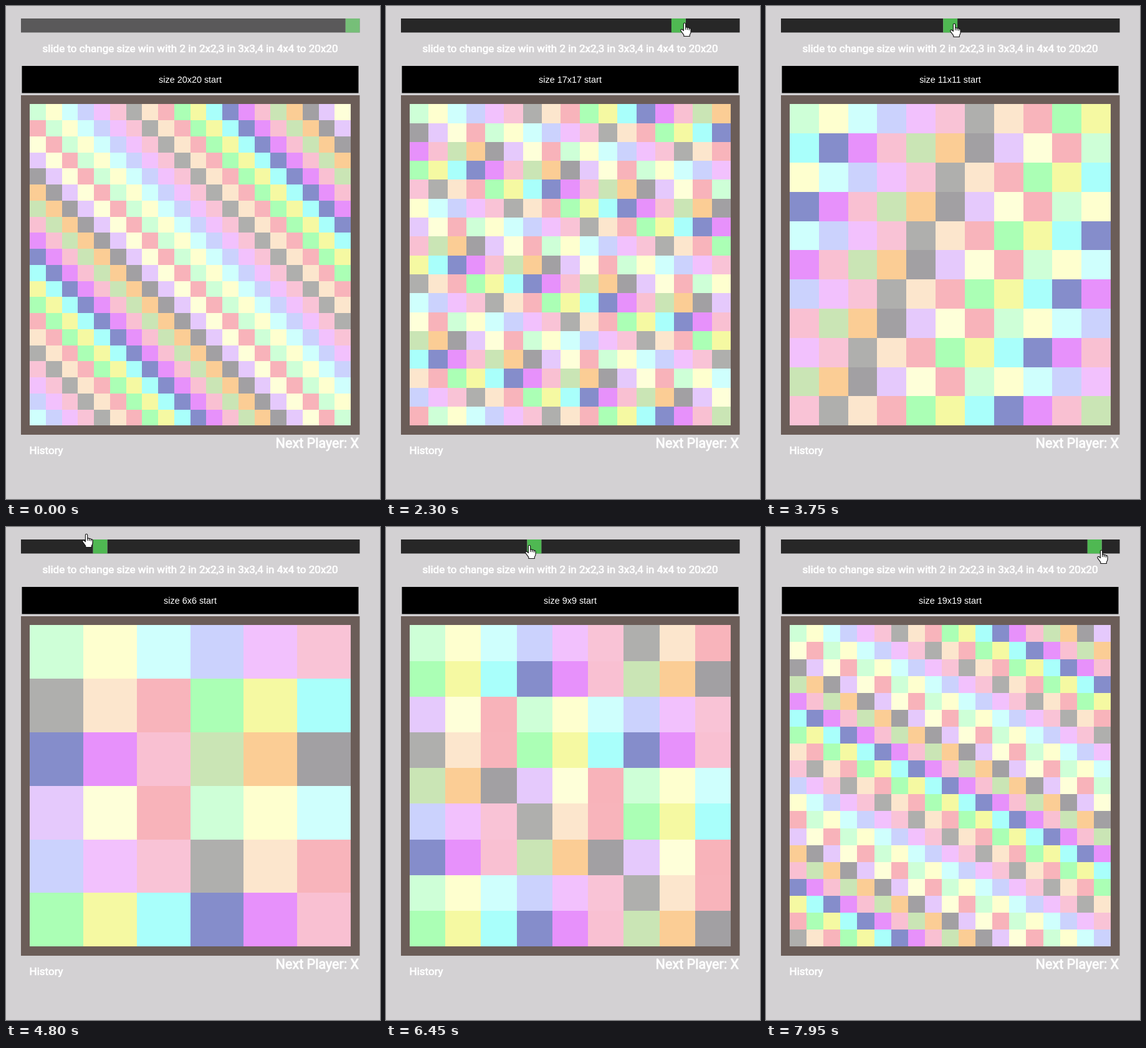
An HTML page with a canvas for the animation above (8 s loop, 600 by 790 pixels).

```html
<!DOCTYPE html>
<html lang="en">
<head>
<meta charset="utf-8">
<title>Board size slider</title>
<style>
html, body { margin: 0; width: 100%; height: 100%; overflow: hidden; background: #d3d1d3; }
canvas { display: block; }
</style>
</head>
<body>
<canvas id="stage" width="600" height="790"></canvas>
<script>
const ctx = document.getElementById('stage').getContext('2d');
const LOOP = 8000, STEP = 50;
const COLORS = ['#ceffd7', '#feffcf', '#cffffd', '#cbd2fd', '#f2c1fd', '#f9c3d6', '#afafad',
  '#fce6cd', '#f8b4bb', '#abffb5', '#f5f9a2', '#a9fffb', '#858dcb', '#e791fb', '#f9c0d2',
  '#cae5b5', '#fbcd95', '#a2a0a3', '#e5c9fc', '#feffd9', '#f8b3ba'];

// Keys are [time, ...values], joined by straight lines.
const SIZE_KEYS = [[1550, 20], [2300, 17], [3750, 11], [4800, 5.8], [5400, 2], [5700, 2],
  [6450, 9], [7950, 19]];
const HAND_KEYS = [[1250, 606, 45], [1450, 556, 32], [1600, 552, 30], [2300, 479, 27],
  [3750, 302, 28], [4800, 129, 11], [5400, 27, 13], [5600, 28, 15], [5700, 28, 15],
  [6450, 230, 29], [7950, 538, 37]];
const HOVER_KEYS = [[1400, 0.7], [1600, 1]];

function sample(keys, t) {
  if (t <= keys[0][0]) return keys[0].slice(1);
  for (let i = 1; i < keys.length; i++) {
    const a = keys[i - 1], b = keys[i];
    if (t <= b[0]) {
      const k = (t - a[0]) / (b[0] - a[0]);
      return a.slice(1).map((v, j) => v + (b[j + 1] - v) * k);
    }
  }
  return keys[keys.length - 1].slice(1);
}

function rect(color, x, y, w, h) {
  ctx.fillStyle = color;
  ctx.fillRect(x, y, w, h);
}

function label(text, x, y, font, align, weight = 0) {
  ctx.font = font;
  ctx.textAlign = align;
  ctx.fillStyle = ctx.strokeStyle = '#fff';
  ctx.fillText(text, x, y);
  if (weight) {
    ctx.lineWidth = weight;
    ctx.lineJoin = 'round';
    ctx.strokeText(text, x, y);
  }
}

function drawSlider(n, opacity) {
  ctx.globalAlpha = opacity;
  rect('#272727', 24, 20, 543.5, 22.5);
  ctx.globalAlpha = 1;
  const x = 24 + (n - 2) * 28.93;
  rect('#d3d1d3', x, 20, 22.7, 22.5);
  ctx.globalAlpha = opacity;
  rect('#4fb852', x, 20, 22.7, 22.5);
  ctx.globalAlpha = 1;
}

function drawBoard(n) {
  rect('#6b5d58', 24, 143, 543.5, 544);
  const edge = (start, i) => Math.round(start + i * 515 / n);
  for (let row = 0; row < n; row++) {
    for (let col = 0; col < n; col++) {
      const x = edge(38, col), y = edge(157.3, row);
      rect(COLORS[(row * n + col) % COLORS.length], x, y,
        edge(38, col + 1) - x, edge(157.3, row + 1) - y);
    }
  }
}

const hand = new Path2D('M-1.6 1.8Q-1.6 .3 0 .3T1.7 1.8V7.2Q3.6 6.2 4.5 7.8Q6.4 7 7.3 8.7' +
  'Q10 8.2 10 11V15Q10 17 8.3 19V21.5H-1.2V19.4L-5.6 13.4Q-7 11.4-5.4 10.6T-1.6 12.6Z');
const knuckles = new Path2D('M1.7 7V11M4.5 8V11.3M7.3 9V11.8');

function drawHand(x, y) {
  ctx.save();
  ctx.translate(x, y);
  ctx.fillStyle = '#fff';
  ctx.strokeStyle = '#111';
  ctx.lineWidth = 1.1;
  ctx.lineJoin = 'round';
  ctx.fill(hand);
  ctx.stroke(hand);
  ctx.stroke(knuckles);
  ctx.restore();
}

function draw(t) {
  const n = Math.round(sample(SIZE_KEYS, t)[0]);
  rect('#d3d1d3', 0, 0, 600, 790);
  drawSlider(n, sample(HOVER_KEYS, t)[0]);
  label('slide to change size win with 2 in 2x2,3 in 3x3,4 in 4x4 to 20x20',
    295.5, 73.5, '17px Roboto, sans-serif', 'center', 0.7);
  rect('#000', 25.5, 96, 540, 43.5);
  label(`size ${n}x${n} start`, 295.5, 122.5, '14.4px "Liberation Sans", Arial, sans-serif', 'center');
  drawBoard(n);
  label('History', 37.5, 718, '17px Roboto, sans-serif', 'left', 0.7);
  label('Next Player: X', 566, 708, '21.6px Roboto, sans-serif', 'right', 0.8);
  if (t >= HAND_KEYS[0][0]) drawHand(...sample(HAND_KEYS, t));
}

const start = performance.now();
function frame() {
  const t = (performance.now() - start) % LOOP;
  draw(Math.floor(t / STEP) * STEP);
  requestAnimationFrame(frame);
}
frame();
</script>
</body>
</html>
```
